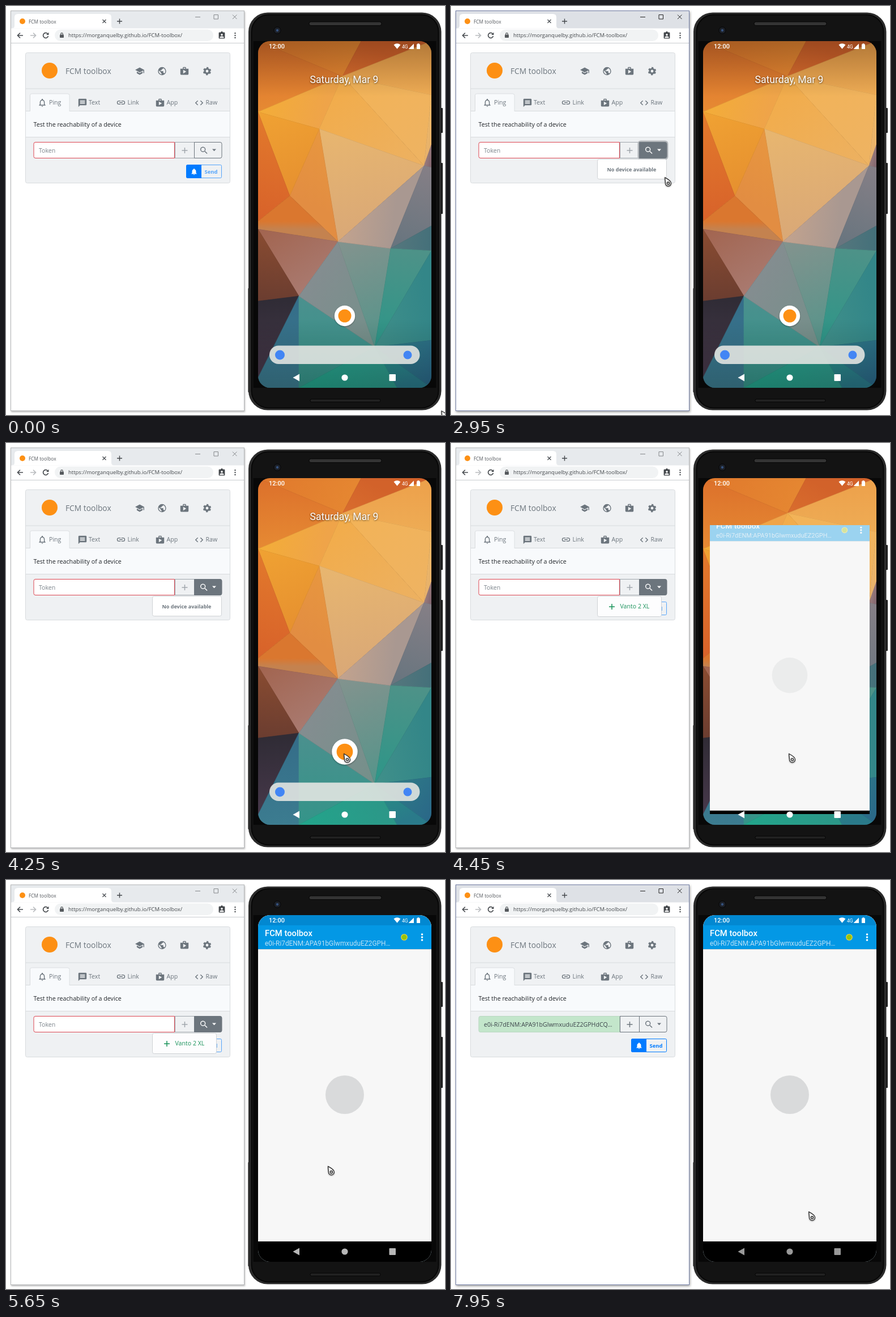
An HTML page that plays this animation: 775 by 722 pixels, repeating every 8 s.

```html
<!DOCTYPE html>
<html lang="en">
<head>
<meta charset="utf-8">
<title>FCM toolbox</title>
<style>
  html, body { margin: 0; width: 100%; height: 100%; overflow: hidden; background: #fff; }
  svg { display: block; }
  text { font: 10.6px "Open Sans", sans-serif; white-space: pre; }
  .phone text { font-family: Roboto, sans-serif; }
  #win { --edge: #b4b6b8; --bar: #e7eaed; --ctl: #85888b; filter: drop-shadow(1px 2px 1.5px #0004); }
  #win.focus { --edge: #7480a8; --bar: #dee1e6; --ctl: #222; filter: drop-shadow(1px 2px 2px #0006); }
  .line { fill: none; stroke: #4a4e52; stroke-width: 1.7; }
</style>
</head>
<body>
<script>
const LOOP = 8000;
const URL_TEXT = 'https://morganquelby.github.io/FCM-toolbox/';
const TOKEN = 'e0i-Ri7dENM:APA91bGlwmxuduEZ2GPH';
const GREY = '#6c757d', BLUE = '#007bff', ORANGE = '#fd9014', PAPER = '#f7f7f7';

// Icons on a 24 unit grid
const icons = {
  school: 'M5 13.2v4L12 21l7-3.8v-4L12 17zM12 3L1 9l11 6 9-4.9V17h2V9z',
  shop: 'M16 6V4a2 2 0 0 0-2-2h-4a2 2 0 0 0-2 2v2H2v13a2 2 0 0 0 2 2h16a2 2 0 0 0 2-2V6zm-6-2h4v2h-4zM9 18V9l7.5 4z',
  globe: 'M12 2a10 10 0 1 0 0 20 10 10 0 0 0 0-20zM4.2 10.2L9 15v1l2 2v2a8 8 0 0 1-6.8-9.8zM18 17.4L16 16h-1v-4H8v-2h3V7h2l2-2.4a8 8 0 0 1 3 12.8z',
  bell: 'M12 22a2 2 0 0 0 2-2h-4a2 2 0 0 0 2 2zm6-6v-5c0-3-1.6-5.6-4.5-6.3V4a1.5 1.5 0 0 0-3 0v.7C7.6 5.4 6 8 6 11v5l-2 2v1h16v-1z',
  bellHole: 'M16 17H8v-6c0-2.5 1.5-4.5 4-4.5s4 2 4 4.5z',
  message: 'M20 2H4a2 2 0 0 0-2 2v18l4-4h14a2 2 0 0 0 2-2V4a2 2 0 0 0-2-2zm-2 12H6v-2h12zm0-3H6V9h12zm0-3H6V6h12z',
  link: 'M3.9 12A3.1 3.1 0 0 1 7 8.9h4V7H7a5 5 0 0 0 0 10h4v-1.9H7A3.1 3.1 0 0 1 3.9 12zM8 13h8v-2H8zm9-6h-4v1.9h4a3.1 3.1 0 0 1 0 6.2h-4V17h4a5 5 0 0 0 0-10z',
  code: 'M9.4 16.6L4.8 12l4.6-4.6L8 6l-6 6 6 6zm5.2 0l4.6-4.6-4.6-4.6L16 6l6 6-6 6z',
  search: 'M15.5 14h-.8l-.3-.3a6.5 6.5 0 1 0-.7.7l.3.3v.8l5 5 1.5-1.5zm-6 0a4.5 4.5 0 1 1 0-9 4.5 4.5 0 0 1 0 9z',
  badge: 'M19 3h-4a3 3 0 0 0-6 0H5a2 2 0 0 0-2 2v14a2 2 0 0 0 2 2h14a2 2 0 0 0 2-2V5a2 2 0 0 0-2-2zm-7 4a3 3 0 1 1 0 6 3 3 0 0 1 0-6zm6 12H6v-1.5c0-4 12-4 12 0z'
};

const icon = (name, cx, cy, fill = GREY, scale = .72) =>
  `<path d="${icons[name]}" fill="${fill}" fill-rule="evenodd" transform="translate(${cx} ${cy}) scale(${scale}) translate(-12 -12)"/>`;
const text = (x, y, str, fill, size = 10.6, weight = 400, extra = '') =>
  `<text x="${x}" y="${y}" style="font-size:${size}px;font-weight:${weight};fill:${fill}" ${extra}>${str}</text>`;
const rect = (x, y, w, h, fill, extra = '') =>
  `<rect x="${x}" y="${y}" width="${w}" height="${h}" fill="${fill}" ${extra}/>`;
const circle = (cx, cy, r, fill, extra = '') =>
  `<circle cx="${cx}" cy="${cy}" r="${r}" fill="${fill}" ${extra}/>`;
const plus = (cx, cy, r, extra) =>
  `<path d="M${cx - r} ${cy}h${2 * r}M${cx} ${cy - r}v${2 * r}" fill="none" ${extra}/>`;
const dots = (x, y, gap, r, fill) => [-gap, 0, gap].map(d => circle(x, y + d, r, fill)).join('');

// Low-poly wallpaper: one letter per vertex, each facet shaded from its first to its last vertex
const vertices = { a: [445, 62], b: [627, 62], c: [751, 62], d: [594, 124], e: [751, 157], f: [445, 187],
  g: [553, 217], h: [738, 282], i: [501, 335], j: [586, 416], k: [445, 380], l: [445, 394], m: [517, 512],
  n: [445, 521], o: [445, 656], p: [517, 674], q: [651, 602], r: [679, 428], s: [751, 245], t: [751, 285],
  u: [751, 388], v: [751, 432], w: [751, 590], x: [690, 674], y: [751, 674], z: [445, 674] };
const facets = {
  abd: '#e0782c #e58631', bcd: '#d2622a #d96d2e', cde: '#eda04a #eeac55', adf: '#dc702b #e68a33',
  fdg: '#f3ad38 #efa449', deh: '#f3b357 #eeb362', dgh: '#f2ac4a #ecb162', ghj: '#e8b66f #d9a877',
  gji: '#e8973f #e28d42', fgi: '#f0a233 #e6902f', fik: '#e27a2c #d8622a', kijl: '#da772f #c4824f',
  esh: '#f0b965 #e6b06c', ljm: '#a2644f #a97a70', lmn: '#8a4c31 #6b3d30', nmo: '#302c36 #47384a',
  mozp: '#346c88 #3c7c90', mqp: '#4b908e #349489', mjq: '#848d90 #74908a', jrq: '#83938e #55948a',
  jhr: '#c3a38e #a99891', hst: '#9a7c7c #80646e', htur: '#857f86 #66747e', ruv: '#56777d #44707a',
  rvq: '#4d9288 #2c9688', qvw: '#40908a #338688', qwy: '#2f8086 #2a6688', qyx: '#269083 #2a7a8a', qxp: '#2c9788 #22a58b'
};
const wallpaper = Object.entries(facets).map(([ids, shades]) => {
  const points = [...ids].map(id => vertices[id]);
  const [[x1, y1], [x2, y2], [from, to]] = [points[0], points.at(-1), shades.split(' ')];
  return `<linearGradient id="${ids}" gradientUnits="userSpaceOnUse" x1="${x1}" y1="${y1}" x2="${x2}" y2="${y2}">
    <stop stop-color="${from}"/><stop offset="1" stop-color="${to}"/></linearGradient>
    <polygon points="${points}" fill="url(#${ids})" stroke="url(#${ids})" stroke-width=".6"/>`;
}).join('');

const browser = `
<g id="win">
  ${rect(8.5, 8.5, 412, 706, '#fff', 'stroke="var(--edge)"')}
  ${rect(9, 9, 411, 30.5, 'var(--bar)')}
  <path d="M10 39.5q5 0 5-5V20q0-6 6-6H180q6 0 6 6V34.5q0 5 5 5z" fill="#fff"/>
  ${circle(29, 27, 5, ORANGE)}
  ${text(40, 30.5, 'FCM toolbox', '#55595e', 8.3)}
  <path d="M170.5 24l6 6m0-6l-6 6" class="line" style="stroke-width:1.3"/>
  ${plus(200.5, 27, 4.5, 'stroke="#44484c" stroke-width="1.4"')}
  <path d="M334 19.5h9M367 15.5h7.5v7.5h-7.5zM400 15.5l7.5 7.5m0-7.5l-7.5 7.5" fill="none" stroke="var(--ctl)"/>
  <path d="M30 52H20.5m4.5-4.5L20.5 52l4.5 4.5" class="line"/>
  <path d="M43 52h9.5m-4.5-4.5l4.5 4.5-4.5 4.5" class="line" style="stroke:#b9bcbf"/>
  <path d="M73.5 49A4.5 4.5 0 1 0 74.5 53" class="line"/><path d="M75.5 46.5v4.5h-4.5z" fill="#4a4e52"/>
  ${rect(86, 41.5, 280, 20.5, '#f1f3f4', 'rx="10.2"')}
  ${rect(95, 50.5, 7, 5.5, '#55595d', 'rx=".8"')}
  <path d="M96.7 51v-1.6a1.8 1.8 0 0 1 3.6 0V51" class="line" style="stroke-width:1.1"/>
  ${text(110, 55.3, URL_TEXT, '#44484c', 9.5)}
  ${icon('badge', 381, 52, '#44484c', .6)}
  ${dots(404.5, 52, 4, 1.2, '#44484c')}
  ${rect(9, 65, 411, 1, '#c9cccf')}

  ${rect(34.5, 82.5, 361, 230, '#eff1f3', 'rx="3" stroke="#d8dbde"')}
  ${circle(77, 114, 14, ORANGE)}
  ${text(105, 120, 'FCM toolbox', GREY, 13.8)}
  ${icon('school', 236, 115)}${icon('globe', 275.5, 115)}${icon('shop', 315, 115)}
  ${circle(355, 115, 4, 'none', `stroke="${GREY}" stroke-width="3.2"`)}
  ${circle(355, 115, 6, 'none', `stroke="${GREY}" stroke-width="2.4" stroke-dasharray="3.14" stroke-dashoffset="4.71"`)}
  ${rect(35, 145.5, 360, 1, '#d8dbde')}
  ${rect(35, 186, 360, 45.5, '#f8fafc')}
  <path d="M35 185.5H42.5V158q0-3 3-3H109q3 0 3 3v27.5H395M35 231.5H395" fill="none" stroke="#d8dbde"/>
  <path d="M43 187V158q0-2.5 2.5-2.5H109q2.5 0 2.5 2.5V187z" fill="#f8fafc"/>
  <path d="${icons.bell + icons.bellHole}" fill="${GREY}" fill-rule="evenodd" transform="translate(55.4 162) scale(.72)"/>
  ${icon('message', 135, 171)}${icon('link', 203, 170.5)}${icon('shop', 272, 171)}${icon('code', 341, 171)}
  ${[['Ping', 76], ['Text', 146], ['Link', 214.5], ['App', 283.5], ['Raw', 352.5]].map(([s, x]) => text(x, 174, s, GREY)).join('')}
  ${text(48.5, 213, 'Test the reachability of a device', '#212529', 10.7)}

  <path id="field" d="M297.5 240.5H52q-3 0-3 3v22q0 3 3 3H297.5z"/>
  <text id="token" x="58" y="259"></text>
  <g id="add">${rect(298.5, 240.5, 34, 28, 'none', `stroke="${GREY}"`)}
    ${plus(315.5, 255, 5, `stroke="${GREY}" stroke-width="1.5"`)}</g>
  <rect id="ring" x="331" y="239" width="51" height="31" rx="4" fill="none" stroke="#b3b7bb" stroke-width="3"/>
  <path id="pick" d="M332.5 240.5H378q3 0 3 3v22q0 3-3 3H332.5z" stroke="${GREY}"/>
  <g id="pickIcon">${icon('search', 349.5, 255, 'inherit')}<path d="M364 252.5h7l-3.5 3.7z"/></g>
  <g id="send">${rect(318.5, 280.5, 62, 23, 'none', `rx="2" stroke="${BLUE}"`)}
    ${text(350.5, 296, 'Send', BLUE, 9.5, 700)}</g>
  <path d="M345 280H321q-3 0-3 3v18q0 3 3 3H345z" fill="${BLUE}"/>
  ${icon('bell', 332, 292.5, '#fff', .58)}
  <g id="empty">${rect(258.5, 270.5, 122, 35, '#fff', 'rx="3" stroke="#cfd2d5"')}
    ${text(275.5, 291.5, 'No device available', GREY, 9, 700)}</g>
  <g id="device">${rect(258.5, 270.5, 113, 36, '#fdfdfe', 'rx="3" stroke="#cfd2d5"')}
    ${plus(284, 289, 5, 'stroke="currentColor" stroke-width="1.5"')}
    ${text(298.5, 292, 'Vanto 2 XL', 'currentColor')}</g>
  <g id="status">${rect(10, 694, 226, 19.5, '#dee1e6', 'rx="2"')}${text(16, 707, URL_TEXT + '#', '#5f6368', 9.5)}</g>
</g>`;

const phone = `
<g class="phone">
  ${rect(766, 180, 5, 44, '#1a1a1a', 'rx="1"')}${rect(766, 277, 5, 90, '#1a1a1a', 'rx="1"')}
  ${rect(427.3, 498, 3, 184, '#2c2c2c', 'rx="1"')}
  ${rect(428, 11.5, 340.5, 702, '#2b2b2b', 'rx="34"')}
  ${rect(433.5, 15.5, 330, 694, '#131313', 'rx="30" stroke="#070707" stroke-width="2"')}
  ${rect(436.5, 62, 323, 612, '#080808')}
  ${rect(535, 28, 128, 6.5, '#343434', 'rx="3.2" stroke="#050505"')}
  ${rect(537, 694, 124, 5, '#222', 'rx="2.5" stroke="#050505"')}
  ${circle(479, 43, 6, '#1c2027', 'stroke="#050505"')}${circle(479, 43, 2.2, '#35507c')}
  <g clip-path="url(#screen)">
    ${wallpaper}
    ${rect(445, 62, 306, 612, 'url(#scrim)', 'id="shade"')}
    <g id="home">
      ${text(536.5, 135.5, 'Saturday, Mar 9', '#fff', 17.6, 400, 'filter="drop-shadow(0 1px 1.5px #0009)"')}
      ${rect(465, 599.5, 265.5, 32.5, '#e6e8e4', 'rx="16.2" opacity=".88"')}
      ${circle(483.5, 616, 8.5, '#4285f4')}${circle(709, 616, 7.5, '#4285f4')}
      <g id="launcher">${circle(0, 0, 18.2, '#fff', 'filter="drop-shadow(0 1px 1px #0005)"')}${circle(0, 0, 11.5, ORANGE)}</g>
    </g>
    <g id="app" clip-path="url(#window)"><g id="content">
      ${rect(445, 62, 306, 612, PAPER)}
      ${rect(445, 122, 306, 1, '#d2d4d5')}
      ${rect(445, 62, 306, 18.5, '#0288d1')}${rect(445, 80, 306, 42, '#0398e5')}
      ${text(457, 98.5, 'FCM toolbox', '#fff', 14.8, 500)}
      ${text(457, 115.5, TOKEN + '…', '#bfe2f7', 11.85)}
      ${circle(703, 101, 5.2, '#98c40c', 'stroke="#ecd23a" stroke-width="1.3"')}
      ${dots(734.5, 101, 5, 1.8, '#fff')}
      ${circle(598, 379, 34, '#d9dadb')}
      ${rect(445, 62, 306, 576, PAPER, 'id="splash"')}
      ${rect(445, 638, 306, 36, '#000')}
    </g></g>
    ${text(464, 75.3, '12:00', '#fff', 11, 500)}
    <path d="M684.5 68.5q6-4.5 12 0l-6 7.3zM711 76V75.5l9-9V76zM725 67.5h1.5v-1.3h3v1.3H731V76h-6z" fill="#fff"/>
    ${text(699, 75, '4G', '#fff', 8.5)}
    <g id="nav"><path d="M518 649.5v13l-11.5-6.5z"/>${circle(598, 656, 5.6, 'inherit')}${rect(676.5, 650, 11.5, 12, 'inherit', 'rx="1"')}</g>
  </g>
</g>`;

document.body.innerHTML = `
<svg width="775" height="722" viewBox="0 0 775 722">
  <defs>
    <clipPath id="screen"><rect x="445" y="62" width="306" height="612" rx="21"/></clipPath>
    <clipPath id="window"><rect id="frame"/></clipPath>
    <linearGradient id="scrim" x2="0" y2="1">
      <stop stop-opacity=".25"/><stop offset=".16" stop-opacity="0"/>
      <stop offset=".8" stop-opacity="0"/><stop offset="1" stop-opacity=".22"/>
    </linearGradient>
  </defs>
  ${browser}${phone}
  <g id="cursor" filter="drop-shadow(0 1px 1px #0006)">
    <path d="M.7.7C5 3 11.5 6 11.5 10.8A5 5 0 0 1 1.5 10.8C1.5 8 .7 4 .7.7z" fill="#f3f3f3" stroke="#2b2b2b" stroke-width="1.3"/>
    <circle id="eye" cx="6.5" cy="10.8" r="2.3" stroke-width="1.2"/>
  </g>
</svg>`;

const $ = id => document.getElementById(id);
const set = (id, attrs) => { for (const k in attrs) $(id).setAttribute(k, attrs[k]); };
const show = (id, on) => set(id, { opacity: +on });
const ramp = (t, from, to) => Math.min(1, Math.max(0, (t - from) / (to - from)));
const mix = (a, b, k) => a + (b - a) * k;
const rgb = (a, b, k) => `rgb(${a.map((v, i) => mix(v, b[i], k))})`;

// Cursor path: time, x, y
const path = [[0, 768, 714], [100, 790, 740], [590, 213, 740], [600, 213, 740], [1450, 367, 248], [2350, 367, 248],
  [2950, 377, 302], [3900, 596, 548], [5450, 596, 548], [5650, 568, 505], [6250, 331, 287],
  [6450, 333, 290], [7200, 333, 290], [7950, 631, 585], [8000, 634, 588]];

// Monotone cubic through the path, along one axis
function along(t, axis) {
  const slope = i => path[i] && path[i + 1] ? (path[i + 1][axis] - path[i][axis]) / (path[i + 1][0] - path[i][0]) : 0;
  const tangent = i => {
    const a = i ? slope(i - 1) : slope(i), b = slope(i);
    return a * b <= 0 ? 0 : Math.abs(a) < Math.abs(b) ? a : b;
  };
  const i = path.findIndex((p, n) => n === path.length - 2 || t < path[n + 1][0]);
  const [p, q] = [path[i], path[i + 1]], h = q[0] - p[0], u = (t - p[0]) / h, v = 1 - u;
  return p[axis] * (1 + 2 * u) * v * v + q[axis] * (3 - 2 * u) * u * u
    + h * u * v * (tangent(i) * v - tangent(i + 1) * u);
}

function drawBrowser(t) {
  const valid = ramp(t, 6780, 6950), filled = t >= 6800;
  const dark = ramp(t, 1355, 1505) * (1 - valid);
  $('win').classList.toggle('focus', t >= 1500 && t < 3950 || t >= 6650);
  set('field', { fill: rgb([255, 255, 255], [195, 230, 203], valid), stroke: rgb([220, 70, 82], [185, 216, 193], valid) });
  $('token').textContent = filled ? TOKEN + 'dCQ...' : 'Token';
  $('token').style.fill = filled ? '#3c444b' : '#7b838a';
  set('add', { opacity: mix(.6, 1, valid) });
  set('send', { opacity: mix(.65, 1, valid) });
  show('ring', t >= 1500 && t < 3950);
  set('pick', { fill: `rgba(108,117,125,${dark})` });
  set('pickIcon', { fill: rgb([108, 117, 125], [255, 255, 255], Math.max(0, dark * 1.4 - .4)) });
  show('empty', t >= 1550 && t < 4400);
  show('device', t >= 4400 && t < 6800);
  set('device', { color: t < 6150 ? '#19925a' : '#14713f' });
  set('status', { opacity: ramp(t, 6290, 6450) * (1 - ramp(t, 7250, 7400)) });
}

function drawPhone(t) {
  set('shade', { opacity: 1 - ramp(t, 4080, 4250) });
  set('home', { opacity: 1 - ramp(t, 4260, 4380) });
  const press = ramp(t, 4080, 4250);
  set('launcher', { transform: `translate(598 ${547 - 2 * press}) scale(${1 + .25 * press})` });

  const rest = 1 - ramp(t, 4280, 4800), grow = 1 - rest ** 6, rise = 1 - rest ** 4.3;
  const width = mix(45, 306, grow), top = mix(523, 62, rise), bottom = mix(568, 674, rise);
  show('app', t >= 4290);
  set('frame', { x: 598 - width / 2, y: top, width, height: bottom - top, rx: 22 * (1 - grow) ** 2 });
  set('content', { transform: `translate(598 ${(top + bottom) / 2}) scale(${width / 306}) translate(-598 -368)` });
  set('splash', { opacity: 1 - ramp(t, 4300, 4700) });
  const level = 255 - 102 * (1 - (1 - ramp(t, 5100, 6300)) ** 2);
  set('nav', { fill: `rgb(${level},${level},${level})` });
}

function drawCursor(t) {
  const x = along(t, 1), y = along(t, 2);
  const overButton = x > 332 && x < 381 && y > 240 && y < 269;
  const overLink = overButton || t >= 6150 && t < 7300;
  set('cursor', { transform: `translate(${x} ${y})` });
  set('eye', overLink ? { fill: '#8fbf3f', stroke: '#a9cf62' } : { fill: '#bbb', stroke: '#2b2b2b' });
}

function frame(now) {
  const t = now % LOOP;
  drawBrowser(t);
  drawPhone(t);
  drawCursor(t);
  requestAnimationFrame(frame);
}
frame(performance.now());
</script>
</body>
</html>
```
